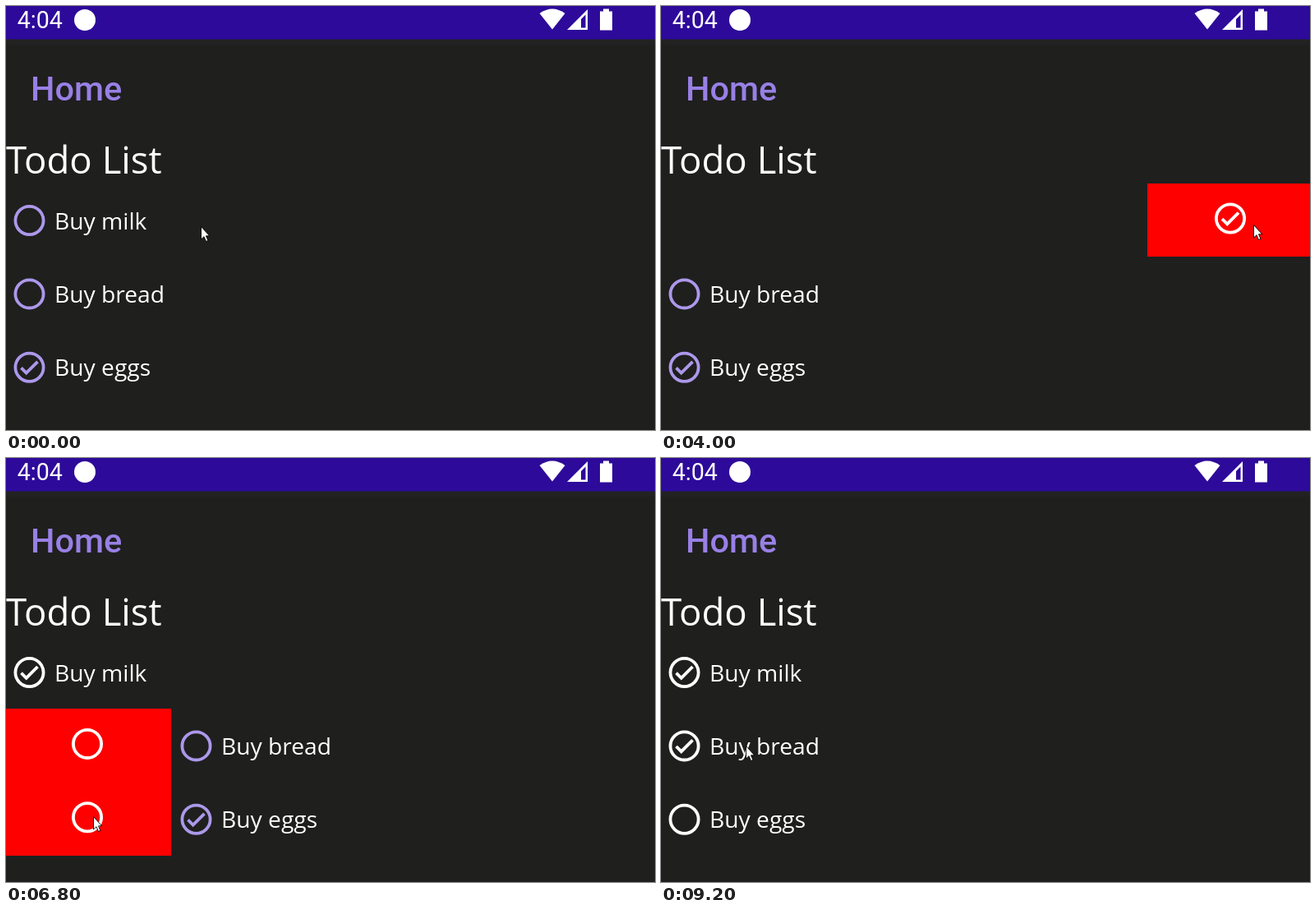
These frames come from a looping animation (790x516 px, 9.4 s). An HTML page:

```html
<!DOCTYPE html>
<html lang="en">
<head>
<meta charset="utf-8">
<title>Todo List</title>
<style>
  html, body { margin: 0; width: 100%; height: 100%; overflow: hidden; background: #1f1f1e; }
  svg { display: block; width: 790px; height: 516px; }
  text { fill: #fff; font-family: "Open Sans", sans-serif; }
  .roboto { font-family: Roboto, sans-serif; }
  .icon { fill: none; stroke: currentColor; stroke-width: 3.8; }
</style>
</head>
<body>
<svg viewBox="0 0 790 516">
  <defs>
    <circle id="ring" class="icon" r="17.1"/>
    <g id="check">
      <use href="#ring"/>
      <path class="icon" d="M-10 .6L-3.8 6.8L10 -7"/>
    </g>
  </defs>

  <rect width="790" height="47" fill="#232222"/>
  <rect width="790" height="40.5" fill="#2d0a9a"/>

  <text class="roboto" x="13.8" y="27" font-size="28.6">4:04</text>
  <g fill="#fff">
    <circle cx="96" cy="17" r="13"/>
    <path d="M665 28.5L649.5 9Q665 -2 680.5 9Z"/>
    <path fill-rule="evenodd" d="M708 4V29H683ZM705.5 10.5V26.5H700V16Z"/>
    <path d="M727 3.5h7v3h4v23h-15v-23h4Z"/>
  </g>

  <text class="roboto" x="30" y="114.5" font-size="41.4" font-weight="500" style="fill:#9880e5">Home</text>
  <text x="0" y="204" font-size="45.5">Todo List</text>

  <g id="rows"></g>
  <path id="cursor" d="M.5 .5V16L4 12.7L6.5 18.5L9 17.5L6.5 11.8H10.8Z" fill="#fff" stroke="#000" stroke-width=".9"/>
</svg>

<script>
const LOOP = 9400, STEP = 200, ROW_TOP = 216, ROW_HEIGHT = 89.4;
const PURPLE = '#ac98ea', WHITE = '#fff';

const LEFT_BUTTON = { x: 0, width: 201, iconX: 99, travel: 203 };
const RIGHT_BUTTON = { x: 592, width: 198, iconX: 693, travel: -198 };

// The row is dragged from grab to open, snaps back at close; its button goes at hide
const rows = [
  { label: 'Buy milk', icon: '#ring', nextIcon: '#check', button: RIGHT_BUTTON, buttonIcon: '#check',
    grab: 400, open: 1400, close: 4200, hide: 4200 },
  { label: 'Buy bread', icon: '#ring', nextIcon: '#check', button: LEFT_BUTTON, buttonIcon: '#ring',
    grab: 4200, open: 4600, close: 8800, hide: 9000 },
  { label: 'Buy eggs', icon: '#check', nextIcon: '#ring', button: LEFT_BUTTON, buttonIcon: '#ring',
    grab: 5000, open: 5400, close: 7200, hide: 7400 },
];

const home = { x: 237, y: 268 };
const moves = [
  { from: 400, to: 1400, x: 129, y: 263 },
  { from: 1400, to: 2400, x: 118, y: 267 },
  { from: 3000, to: 3800, x: 721, y: 266 },
  { from: 4200, to: 4400, x: 110, y: 345 },
  { from: 4400, to: 4600, x: 320, y: 352 },
  { from: 4600, to: 4800, x: 90, y: 409 },
  { from: 5000, to: 5600, x: 435, y: 480 },
  { from: 6000, to: 6800, x: 106, y: 436 },
  { from: 7200, to: 8200, x: 103, y: 350 },
];

const progress = (t, from, to) => Math.min(1, Math.max(0, (t - from) / (to - from)));

function cursorAt(t) {
  return moves.reduce((point, move) => {
    const k = progress(t, move.from, move.to);
    return { x: point.x + (move.x - point.x) * k, y: point.y + (move.y - point.y) * k };
  }, home);
}

function buildRow(row, index) {
  const { x, width, iconX } = row.button;
  const group = document.createElementNS('http://www.w3.org/2000/svg', 'g');
  group.setAttribute('transform', `translate(0 ${ROW_TOP + index * ROW_HEIGHT})`);
  group.innerHTML = `
    <g class="button">
      <rect x="${x}" width="${width}" height="${ROW_HEIGHT}" fill="#fe0000" shape-rendering="crispEdges"/>
      <use href="${row.buttonIcon}" x="${iconX}" y="42.5" color="${WHITE}"/>
    </g>
    <g class="content">
      <use class="state" x="28.5" y="45"/>
      <text x="59" y="55.5" font-size="28.2">${row.label}</text>
    </g>`;
  document.getElementById('rows').append(group);
  row.buttonNode = group.querySelector('.button');
  row.contentNode = group.querySelector('.content');
  row.stateNode = group.querySelector('.state');
}

function drawRow(row, t) {
  const closed = t >= row.close;
  const offset = closed ? 0 : row.button.travel * progress(t, row.grab, row.open);
  row.buttonNode.style.display = t > row.grab && t < row.hide ? '' : 'none';
  row.contentNode.setAttribute('transform', `translate(${offset} 0)`);
  row.stateNode.setAttribute('href', closed ? row.nextIcon : row.icon);
  row.stateNode.setAttribute('color', closed ? WHITE : PURPLE);
}

const cursor = document.getElementById('cursor');
const start = performance.now();

function frame() {
  const elapsed = (performance.now() - start) % LOOP;
  const t = Math.floor(elapsed / STEP) * STEP;
  const { x, y } = cursorAt(t);
  rows.forEach(row => drawRow(row, t));
  cursor.setAttribute('transform', `translate(${x} ${y})`);
  requestAnimationFrame(frame);
}

rows.forEach(buildRow);
frame();
</script>
</body>
</html>
```
